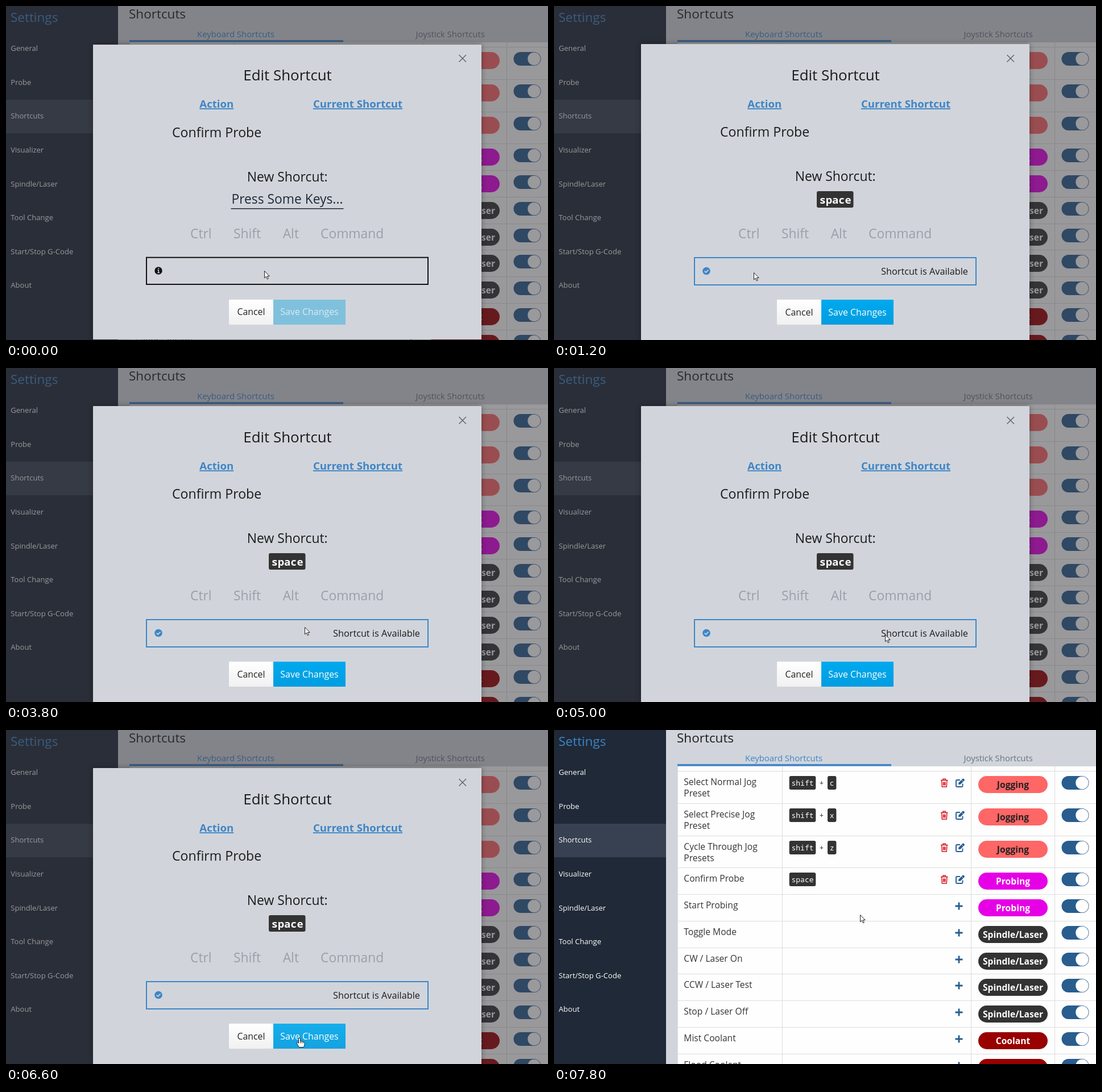
These frames come from a looping animation (953x588 px, 8 s). An HTML page:

```html
<!DOCTYPE html>
<html lang="en">
<head>
<meta charset="utf-8">
<title>Edit Shortcut</title>
<style>
html, body { margin: 0; width: 100%; height: 100%; overflow: hidden; background: #d1d5db; }
svg { display: block; width: 953px; height: 588px; font-family: "Open Sans", sans-serif; }
.mono { font-family: "Noto Sans Mono", "DejaVu Sans Mono", monospace; }
.b { font-weight: 700; }
.semi { font-weight: 600; }
.u { text-decoration: underline; }
.mid { text-anchor: middle; }
.end { text-anchor: end; }
#panel { filter: drop-shadow(0 0 5px rgba(10, 10, 10, .4)); }
</style>
</head>
<body>
<svg id="stage" viewBox="0 0 953 588"></svg>
<script>
const BLUE = '#3e85c7', NAVY = '#285d8e', DARK = '#333', PALE = '#d1d5db';
const rect = (x, y, w, h, fill, r = 0, more = '') =>
  `<rect x="${x}" y="${y}" width="${w}" height="${h}" rx="${r}" fill="${fill}" ${more}/>`;
const text = (x, y, size, fill, s, cls = '') =>
  `<text x="${x}" y="${y}" font-size="${size}" fill="${fill}" class="${cls}">${s}</text>`;
const line = (d, stroke, w = 1, more = '') =>
  `<path d="${d}" fill="none" stroke="${stroke}" stroke-width="${w}" ${more}/>`;
const group = (id, body) => `<g id="${id}">${body}</g>`;

function sidebar() {
  const items = ['General', 'Probe', 'Shortcuts', 'Visualizer', 'Spindle/Laser',
    'Tool Change', 'Start/Stop G-Code', 'About'];
  return rect(0, 0, 197, 588, '#1f2937') + rect(0, 165, 197, 59, '#374151') +
    text(8, 28, 22.5, BLUE, 'Settings') +
    items.map((s, i) => text(8.3, Math.round(79.3 + i * 59.55), 13.05, '#fff', s)).join('');
}

const header = rect(197, 0, 756, 588, PALE) + rect(217, 64, 736, 524, '#fefefe') +
  text(216, 22, 22.5, '#1c1c1c', 'Shortcuts') +
  text(336, 55, 14.9, BLUE, 'Keyboard Shortcuts') +
  text(720.5, 55, 14.9, '#6b7280', 'Joystick Shortcuts') +
  rect(217, 60, 376, 3.5, BLUE);

const kinds = {
  Jogging: ['#ff6666', '#222'], Probing: ['#e600e6', '#fff'],
  'Spindle/Laser': [DARK, '#fff'], Coolant: ['#900', '#fff']
};
const rows = [
  ['Select Normal Jog|Preset', 'shift c', 'Jogging'],
  ['Select Precise Jog|Preset', 'shift x', 'Jogging'],
  ['Cycle Through Jog|Presets', 'shift z', 'Jogging'],
  ['Confirm Probe', 'space', 'Probing'],
  ['Start Probing', '', 'Probing'],
  ['Toggle Mode', '', 'Spindle/Laser'],
  ['CW / Laser On', '', 'Spindle/Laser'],
  ['CCW / Laser Test', '', 'Spindle/Laser'],
  ['Stop / Laser Off', '', 'Spindle/Laser'],
  ['Mist Coolant', '', 'Coolant'],
  ['Flood Coolant', '', 'Coolant']
];
const rowTop = i => Math.round(i < 4 ? 72 + i * 56.75 : 242.4 + (i - 3) * 46.75);

function key(x, y, s) {
  const w = s.length * 7.8 + 7.6;
  return rect(x, y, w, 24, DARK, 3) + text(x + w / 2, y + 16.5, 13, '#fff', s, 'mono mid');
}
function icons(y) {
  const trash = 'M680 -4.5h12.5M684 -5v-1.8h4.5v1.8M681.7 -4l.6 11h8l.6 -11M684.5 -1.5v6M686.3 -1.5v6M688.1 -1.5v6';
  return `<g transform="translate(0 ${y})">` + line(trash, '#d8141c', 1.4) +
    line('M714 -5h-5.5q-1.5 0 -1.5 1.5v9q0 1.5 1.5 1.5h8.5q1.5 0 1.5 -1.5v-4', NAVY, 1.9) +
    `<path d="M711 3l.5 -3.3 6.7 -6.7q1.2 -1.2 2.4 0l.8 .8q1.2 1.2 0 2.4l-6.7 6.6z" fill="${NAVY}"/>` +
    line('M716.5 -5.3l3.2 3.2', '#fefefe', .8) + '</g>';
}

let table = '';
rows.forEach(([name, keys, kind], i) => {
  const y = rowTop(i), [fill, ink] = kinds[kind];
  table += line(`M217 ${y + .5}H953`, '#ddd');
  name.split('|').forEach((s, n) => { table += text(228.3, y + 25 + n * 20, 15.6, '#333', s); });
  const [first, second] = keys.split(' ');
  if (first) table += key(413.7, y + 9, first) + icons(y + 21);
  else table += line(`M705.5 ${y + 21}h13M712 ${y + 14.5}v13`, NAVY, 2.8);
  if (second) table += text(470.5, y + 26, 13, '#333', '+', 'mono mid') + key(481, y + 9, second);
  table += rect(892.5, y + 9, 48, 24, NAVY, 12) + `<circle cx="928.5" cy="${y + 21}" r="11.2" fill="#fff"/>` +
    rect(746, y + 9, 122, 30, fill, 15) + text(807, y + 30, 15.6, ink, kind, 'b mid');
});
table += [217.5, 401.5, 733.5, 880.5].map(x => line(`M${x} 64V588`, '#ddd')).join('');

const modalBase = line('M796.5 86l12.5 12.5M809 86l-12.5 12.5', '#666', 1.5) +
  text(340.3, 179, 18.64, BLUE, 'Action', 'b u') +
  text(539.9, 179, 18.64, BLUE, 'Current Shortcut', 'b u') +
  [[324, 'Ctrl'], [400, 'Shift'], [486.7, 'Alt'], [553, 'Command']]
    .map(([x, s]) => text(x, 409, 22.8, '#9a9fa8', s)).join('');

const headings = text(495, 130.5, 25.9, '#1a1a1a', 'Edit Shortcut', 'mid') +
  text(292, 230.3, 23.1, '#1a1a1a', 'Confirm Probe') +
  text(494.7, 308.2, 22.9, '#1a1a1a', 'New Shorcut:', 'mid');

const waiting = text(494.5, 348, 22.8, '#1f2937', 'Press Some Keys...', 'mid') +
  rect(395.5, 356, 198, 1.5, '#1f2937') +
  rect(247, 442.7, 495, 47.3, 'none', 0, 'stroke="#111" stroke-width="2"') +
  '<circle cx="268" cy="466" r="6.7" fill="#111"/>' +
  line('M266.5 465h1.8v4M266.3 469.5h3.7M267.2 462.3h2', PALE, 1.5) +
  rect(470, 517, 127, 44, '#7fc1dc') +
  text(533.5, 544, 15.95, '#d8ebf3', 'Save Changes', 'mid');

const ready = rect(462, 326, 64.5, 29, DARK, 3) +
  text(494.7, 348, 18.6, '#fff', 'space', 'mono mid semi') +
  rect(247, 443, 495, 48, 'none', 0, `stroke="${BLUE}" stroke-width="2"`) +
  `<circle cx="268" cy="466.5" r="6.8" fill="${BLUE}"/>` +
  line('M264.7 466.7l2.4 2.4 4.4 -4.5', PALE, 1.7) +
  text(728, 473, 16.3, '#1a1a1a', 'Shortcut is Available', 'end') +
  rect(470, 517, 127, 44, 'url(#blue)', 0, 'id="save"') +
  text(533.5, 545, 15.95, '#fff', 'Save Changes', 'mid');

const gradient = (id, a, b) => `<linearGradient id="${id}" x2="0" y2="1">
  <stop stop-color="${a}"/><stop offset="1" stop-color="${b}"/></linearGradient>`;

const stage = document.getElementById('stage');
stage.innerHTML = `<defs>${gradient('blue', '#00a9ee', '#009de0')}${gradient('plain', '#fff', '#f1f1f1')}</defs>` +
  header + '<clipPath id="body"><path d="M0 64H953V588H0z"/></clipPath>' +
  `<g clip-path="url(#body)">${table}</g>` + sidebar() +
  group('shade', rect(0, 0, 953, 588, '#36343b', 0, 'opacity=".5"')) +
  group('modal', rect(153, 67, 683, 522, PALE, 1, 'id="panel"') + modalBase +
    group('heads', headings) + rect(392, 517, 78, 44, 'url(#plain)', 1) +
    group('cancel', text(431, 545, 15.9, '#222', 'Cancel', 'mid')) +
    group('waiting', waiting) + group('ready', ready)) +
  group('arrow', '<path d="M.5 .5v12.3l2.8 -2.6 2 4.6 2 -.9 -2 -4.4h3.9z" fill="#fff" stroke="#222"/>') +
  group('hand', `<path d="M-1.5 1q1.5 -1.8 3 0v5q1.3 -.9 2.5 .3 1.5 -.8 2.5 .6 2 -.5 2.5 1.3v4l-1.5 4.3h-8l-3.5 -5.5q-2 -2.5 -.4 -3.2 1.2 -.3 2.9 1.9z"
    fill="#fff" stroke="#222"/>` + line('M1.5 6v3.5M4 6.5v3M6.5 7v2.5', '#222', .9));

const el = id => document.getElementById(id);
const show = (id, on) => { el(id).style.display = on ? '' : 'none'; };
const shift = (id, x, y) => el(id).setAttribute('transform', `translate(${x} ${y})`);

// pointer path: time, x, y
const path = [[0, 454, 466], [200, 450, 466], [1200, 351, 469], [1600, 380, 467], [2800, 382, 467],
  [3800, 525, 456], [4000, 556, 460], [4200, 562, 466], [4400, 572, 470], [4800, 572, 470],
  [5000, 582, 469], [6000, 546, 500], [6400, 516, 542], [7200, 516, 542], [7800, 538, 325]];
function pointer(t) {
  const n = path.findIndex(p => p[0] > t);
  if (n < 0) return path[path.length - 1].slice(1);
  const [t0, x0, y0] = path[n - 1], [t1, x1, y1] = path[n];
  const k = (t - t0) / (t1 - t0), e = k * k * (3 - 2 * k);
  return [Math.round(x0 + (x1 - x0) * e), Math.round(y0 + (y1 - y0) * e)];
}

const STEP = 200, LOOP = 8000, PRESS = 600, SAVE = 6800;
function draw(now) {
  const t = Math.floor((now % LOOP) / STEP) * STEP;
  const open = t < SAVE, pressed = t >= PRESS;
  show('shade', open);
  show('modal', open);
  show('waiting', !pressed);
  show('ready', pressed);
  el('panel').setAttribute('y', pressed ? 67 : 68);
  el('panel').setAttribute('height', pressed ? 522 : 519);
  shift('heads', 0, pressed ? 0 : .7);
  shift('cancel', 0, pressed ? 0 : -1);
  const [x, y] = pointer(t);
  const over = open && x > 470 && x < 597 && y > 517;
  el('save').style.opacity = over ? .9 : 1;
  show('arrow', !over);
  show('hand', over);
  shift('arrow', x, y);
  shift('hand', x, y);
  requestAnimationFrame(draw);
}
draw(0);
</script>
</body>
</html>
```
